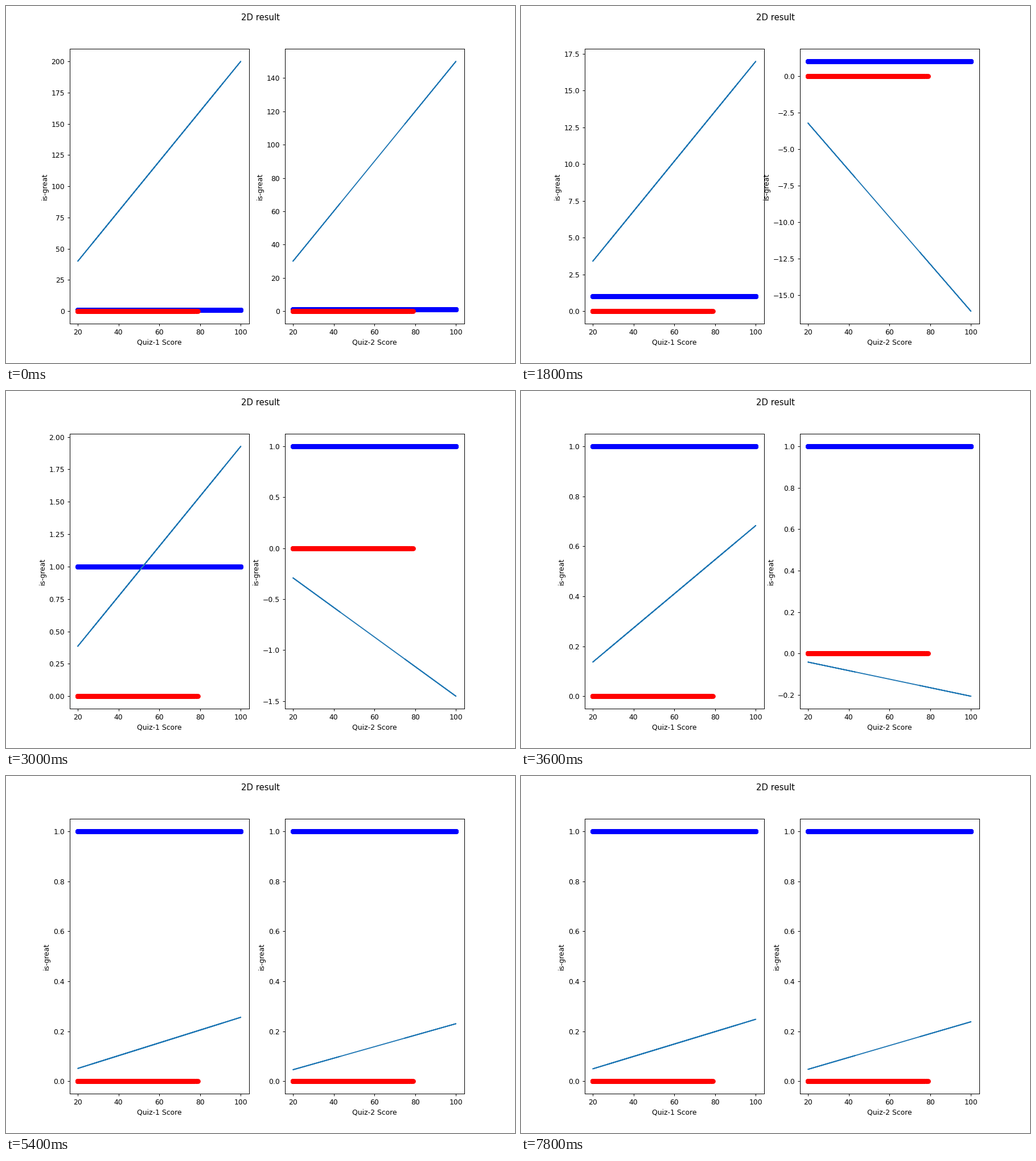
Write a matplotlib script that moves like this. It is 894 by 626 pixels and loops after 8 s.

```python
import math

import matplotlib.pyplot as plt
import numpy as np
from matplotlib.animation import FuncAnimation

FRAMES, INTERVAL = 40, 200

# Every pair of scores from 20 to 100, in random order.
rng = np.random.default_rng(4)
pairs = np.stack(np.meshgrid(np.arange(20, 101), np.arange(20, 101)), -1)
pairs = rng.permutation(pairs.reshape(-1, 2))
is_great = pairs.sum(axis=1) >= 100


def iteration(frame):
    """Every step is shown up to 10, then every tenth."""
    return frame if frame <= 10 else (frame - 9) * 10


def weights(n):
    """Gradient descent: the sum settles fast, the difference slowly."""
    fast = 0.378 ** n
    slow = 0.4951 * 0.9562 ** n
    wobble = 0.011 * slow * (1 - math.exp(-n / 3)) * math.cos(n / 32)
    total = 0.00486 + 3.49514 * fast + wobble
    diff = 0.0001 + slow + 0.0048 * fast
    return (total + diff) / 2, (total - diff) / 2


fig, axes = plt.subplots(1, 2, figsize=(10, 7.0023), dpi=89.4)
fig.suptitle("2D result")


def draw(frame):
    w = weights(iteration(frame))
    for k, ax in enumerate(axes):
        score = pairs[:, k]
        great, poor = score[is_great], score[~is_great]
        ax.clear()
        ax.scatter(great, np.ones(great.size), color="blue")
        ax.scatter(poor, np.zeros(poor.size), color="red")
        ax.plot(score, w[k] * score, color="C0")
        ax.set_xlabel(f"Quiz-{k + 1} Score")
        ax.set_ylabel("is-great")
    return []


anim = FuncAnimation(fig, draw, frames=FRAMES, init_func=lambda: draw(0),
                     interval=INTERVAL, repeat=True, repeat_delay=0)
plt.show()
```
